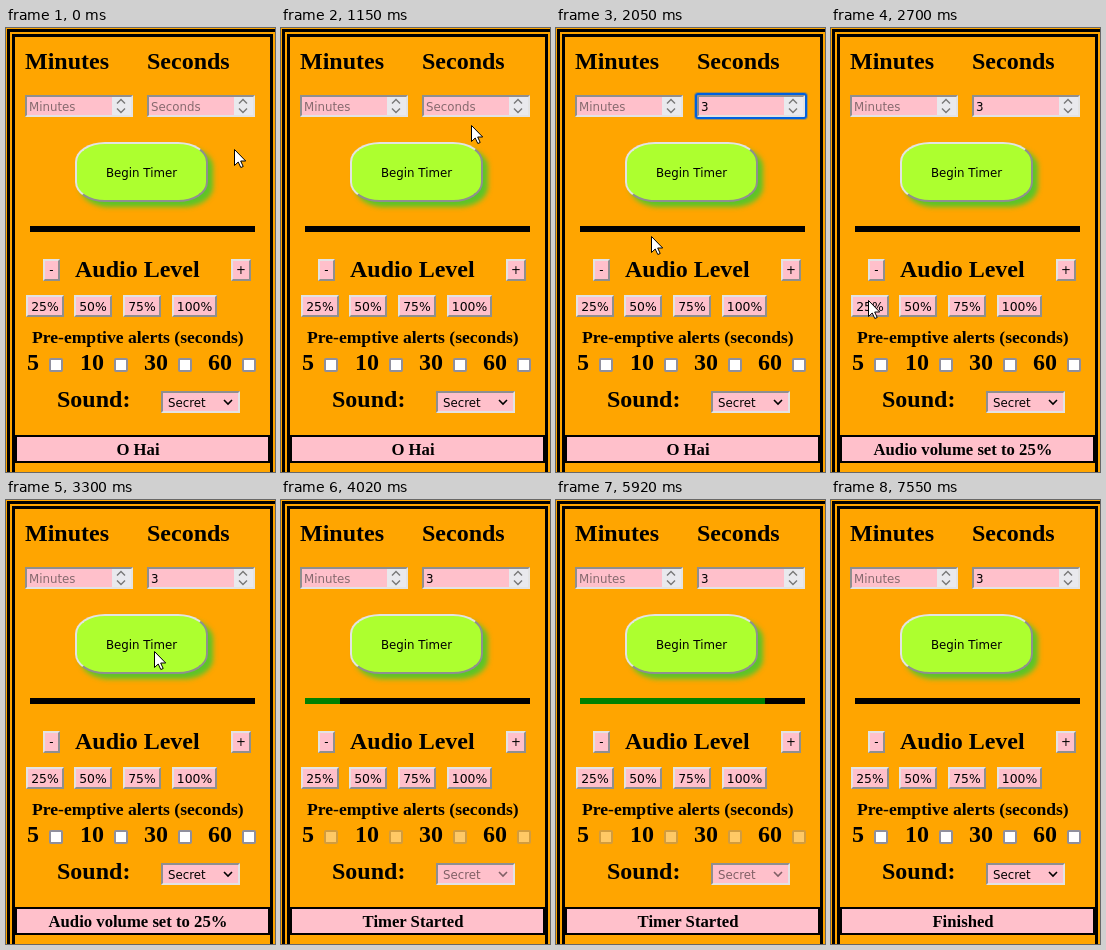
Write an HTML page that moves like this. It is 269 px wide and 444 px high and loops after 8000 ms.

```html
<!DOCTYPE html>
<html lang="en">
<head>
<meta charset="utf-8">
<title>Timer</title>
<style>
html, body { margin: 0; width: 100%; height: 100%; overflow: hidden; background: #ffa500; }
#stage { position: relative; width: 269px; height: 444px; overflow: hidden; }
#stage div, svg { position: absolute; box-sizing: border-box; }
svg { left: 0; top: 0; }
.panel { border: 8px double #000; }
.button { border: 2px outset #e3e3e3; background: #ffc0cb; }
.field { border: 2px inset #e3e3e3; background: #ffc0cb; }
.spin { background: #e9e9ed; }
.check { border: 2px solid #8f8f9d; border-radius: 2px; background: #fff; }
.check.off { opacity: .4; }
.begin { border-radius: 30px / 20px; background: #adff2f; box-shadow: 5px 5px 5px #32cd32cc; }
.button.down { border-style: inset; }
.ring { border: 2px solid #0060df; border-radius: 3px; box-shadow: 0 0 0 1px #0060df55; }
.bar { background: #000; }
.fill { background: #008000; }
.message { border: 2px solid #000; background: #ffc0cb; }
.serif { font: bold 24px "Liberation Serif", serif; }
.sans { font: 11.8px "DejaVu Sans", sans-serif; }
</style>
</head>
<body>
<div id="stage"></div>
<script>
const stage = document.getElementById('stage');
const NS = 'http://www.w3.org/2000/svg';

function box(cls, x, y, w, h) {
  const el = document.createElement('div');
  el.className = cls;
  el.style.cssText = `left:${x}px;top:${y}px;width:${w}px;height:${h}px`;
  return stage.appendChild(el);
}

function shape(tag, attrs, content = '') {
  const el = document.createElementNS(NS, tag);
  for (const key in attrs) el.setAttribute(key, attrs[key]);
  el.textContent = content;
  return svg.appendChild(el);
}

const text = (cls, x, y, content, more = {}) => shape('text', { class: cls, x, y, ...more }, content);
const line = (d, stroke, width = 1.4) => shape('path', { d, fill: 'none', stroke, 'stroke-width': width });
const middle = { 'text-anchor': 'middle' };

// Boxes
box('panel', 1, 1, 271, 480);
const fieldXs = [19, 141];
for (const x of fieldXs) {
  box('field', x, 67, 108, 22);
  box('spin', x + 87, 69, 19, 18);
}
const ring = box('ring', 139, 65, 112, 26);
const begin = box('button begin', 69, 114, 133, 60);
box('bar', 24, 198, 225, 6);
const fill = box('fill', 24, 198, 0, 6);
box('button', 37, 231, 17, 22);
box('button', 225, 231, 20, 22);
const levels = [[20, 38, '25%'], [68, 38, '50%'], [117, 38, '75%'], [166, 45, '100%']];
const levelButtons = levels.map(([x, w]) => box('button', x, 267, w, 22));
const alerts = [[21, 43, 5], [74, 108, 10], [138, 172, 30], [202, 236, 60]];
const checks = alerts.map(([, x]) => box('check', x, 330, 14, 14));
box('field', 155, 363, 79, 22);
box('message', 9, 407, 255, 28);

// Labels and marks
const svg = document.createElementNS(NS, 'svg');
svg.setAttribute('width', 269);
svg.setAttribute('height', 444);
stage.appendChild(svg);

text('serif', 19, 41, 'Minutes');
text('serif', 141, 41, 'Seconds');
text('serif', 69, 249, 'Audio Level');
text('serif', 26, 315, 'Pre-emptive alerts (seconds)', { style: 'font-size:17.6px' });
for (const [x, , n] of alerts) text('serif', x, 342, n);
text('serif', 51, 379, 'Sound:');
text('sans', 23, 83, 'Minutes', { fill: '#876a6f' });
const seconds = text('sans', 145, 83, '');
text('sans', 135.5, 149, 'Begin Timer', middle);
text('sans', 45.5, 246, '-', middle);
text('sans', 235, 246, '+', middle);
for (const [x, w, label] of levels) text('sans', x + w / 2, 283, label, { ...middle, style: 'font-size:12.4px' });
const choice = text('sans', 162, 379, 'Secret');
const chevron = line('M218 372l4 4 4-4', '#000', 1.6);
for (const x of fieldXs) line(`M${x + 92} 75.5l4-4 4 4M${x + 92} 80.5l4 4 4-4`, '#777');
const message = text('serif', 132, 427, '', { ...middle, style: 'font-size:16.7px' });
const cursor = shape('path', {
  d: 'M.5.5V16.5L4.2 13L6.8 18.5L9.2 17.5L6.7 12H11.7Z', fill: '#fff', stroke: '#000'
});

// Pointer path: time, x, y
const path = [
  [800, 228, 121], [1150, 190, 97], [1450, 184, 71], [1700, 184, 71], [2050, 95, 208],
  [2350, 37, 272], [2700, 37, 272], [3250, 148, 151], [3560, 148, 151], [3950, 282, 130]
];

function pointer(t) {
  if (t <= path[0][0]) return path[0].slice(1);
  const i = path.findIndex(p => p[0] > t);
  if (i < 0) return path[path.length - 1].slice(1);
  const [t0, x0, y0] = path[i - 1], [t1, x1, y1] = path[i];
  const k = (t - t0) / (t1 - t0);
  return [x0 + (x1 - x0) * k, y0 + (y1 - y0) * k];
}

const within = (t, from, to) => t >= from && t < to;

function draw(t) {
  cursor.setAttribute('transform', `translate(${pointer(t).map(Math.round)})`);
  ring.hidden = !within(t, 1550, 2570);
  ring.style.display = ring.hidden ? 'none' : '';
  seconds.textContent = t < 1750 ? 'Seconds' : '3';
  seconds.setAttribute('fill', t < 1750 ? '#876a6f' : '#000');

  levelButtons[0].classList.toggle('down', within(t, 2550, 2650));
  begin.classList.toggle('down', within(t, 3470, 3555));

  const running = within(t, 3555, 6540);
  for (const c of checks) c.classList.toggle('off', running);
  choice.setAttribute('fill', running ? '#806066' : '#000');
  chevron.setAttribute('stroke', running ? '#806066' : '#000');

  // The bar grows by 5 px per tick and clears after a pause
  const ticks = within(t, 3555, 7550) ? Math.min(45, Math.floor((t - 3555) / 63.3)) : 0;
  fill.style.width = ticks * 5 + 'px';

  message.textContent = t < 2650 ? 'O Hai'
    : t < 3555 ? 'Audio volume set to 25%'
    : running ? 'Timer Started' : 'Finished';
}

function frame() {
  draw(performance.now() % 8000);
  requestAnimationFrame(frame);
}
frame();
</script>
</body>
</html>
```
